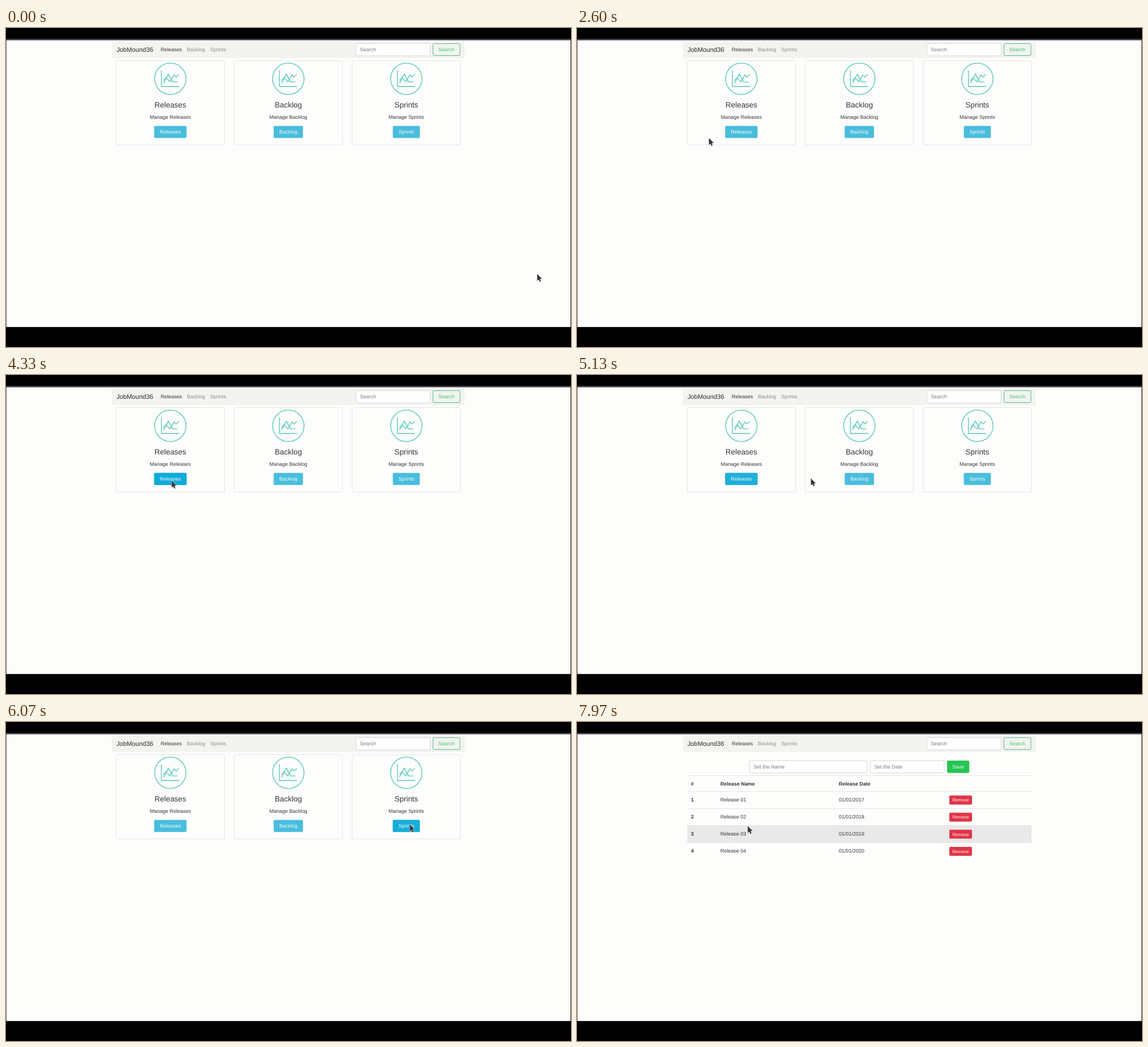
Recreate the animation shown at these times as an HTML page with a canvas. Size 997 by 562 pixels, loop 8000 ms.

```html
<!DOCTYPE html>
<html lang="en">
<head>
<meta charset="utf-8">
<title>Release board</title>
<style>
html, body { margin: 0; width: 100%; height: 100%; overflow: hidden; background: #000; }
canvas { display: block; }
</style>
</head>
<body>
<canvas id="stage" width="997" height="562"></canvas>
<script>
const ctx = document.getElementById('stage').getContext('2d');
const LOOP = 8000, OPEN_TABLE = 7730, ROW_HOVER = 7850, FADE = 200;
const BASE = 8.97, INK = '#333639', MUTED = '#777b7e', RULE = '#e4e4e4', PAGE = '#fdfdfc';
const BUTTON_TOP = 172.6, BUTTON_HEIGHT = 21.2;

// Stops of the pointer: time, x, y
const stops = [
  [0, 937, 433], [170, 937, 433], [830, 937, 427], [1570, 937, 427],
  [1770, 553, 314], [2370, 233, 194], [3100, 232, 193], [3730, 290, 120],
  [4300, 292, 186], [5040, 290, 183], [5130, 412, 182], [6070, 712, 180],
  [6130, 720, 181], [6450, 440, 184], [6670, 358, 184], [7170, 301, 183],
  [LOOP, 301, 183]
];

const cards = ['Releases', 'Backlog', 'Sprints'].map((name, i) => ({ name, x: 290 + 208.2 * i }));

const smooth = v => v * v * (3 - 2 * v);

// Monotone spline slope: zero wherever the pointer turns or rests
function slope(i, k) {
  if (i < 1 || i >= stops.length - 1) return 0;
  const [a, b, c] = stops.slice(i - 1, i + 2);
  const before = (b[k] - a[k]) / (b[0] - a[0]);
  const after = (c[k] - b[k]) / (c[0] - b[0]);
  return before * after > 0 ? 2 * before * after / (before + after) : 0;
}

function pointerAt(t) {
  const i = Math.max(0, stops.findIndex(stop => stop[0] > t) - 1);
  const a = stops[i], b = stops[i + 1], span = b[0] - a[0], u = (t - a[0]) / span;
  return [1, 2].map(k => a[k] + (b[k] - a[k]) * smooth(u)
    + span * u * (1 - u) * ((1 - u) * slope(i, k) - u * slope(i + 1, k)));
}

// Share of the last moments the pointer spent over a button
function hoverAt(x, w, t) {
  const steps = 20;
  let inside = 0;
  for (let i = 0; i < steps; i++) {
    const [px, py] = pointerAt(Math.max(0, t - FADE * i / steps));
    if (Math.abs(px - x) < w / 2 && py > BUTTON_TOP && py < BUTTON_TOP + BUTTON_HEIGHT) inside++;
  }
  return smooth(inside / steps);
}

function fill(x, y, w, h, color) {
  ctx.fillStyle = color;
  ctx.fillRect(x, y, w, h);
}

function box(x, y, w, h, color, border) {
  ctx.beginPath();
  ctx.roundRect(x, y, w, h, 2);
  if (color) { ctx.fillStyle = color; ctx.fill(); }
  if (border) { ctx.strokeStyle = border; ctx.lineWidth = 1; ctx.stroke(); }
}

function setFont(size, weight = 400) {
  ctx.font = `${weight} ${size}px "Liberation Sans", Arial, sans-serif`;
  ctx.textRendering = 'geometricPrecision';
}

// y is the middle of the capitals
function text(str, x, y, { size = BASE, color = INK, align = 'left', weight } = {}) {
  setFont(size, weight);
  ctx.textAlign = align;
  ctx.fillStyle = color;
  ctx.fillText(str, x, y + size * .36);
}

function line(...points) {
  ctx.beginPath();
  points.forEach(([x, y]) => ctx.lineTo(x, y));
  ctx.stroke();
}

function input(label, x, y, w) {
  box(x, y, w, 21.5, '#fefefe', '#d8d8d8');
  text(label, x + 7, y + 10.5, { color: MUTED });
}

function drawNav() {
  fill(187, 23, 622, 30, '#f3f3f0');
  text('JobMound36', 195, 38, { size: 11.2, color: '#2b2b2b' });
  text('Releases', 273, 38);
  text('Backlog', 319.3, 38, { color: '#8b8b89' });
  text('Sprints', 360.5, 38, { color: '#8b8b89' });
  input('Search', 617.5, 27.5, 131);
  box(753.5, 27.5, 47.5, 21, null, '#4dbd8e');
  text('Search', 777.2, 38, { color: '#46c76e', align: 'center' });
}

function drawIcon(x, y) {
  ctx.save();
  ctx.translate(x, y);
  ctx.strokeStyle = '#6ccfc2';
  ctx.lineJoin = 'round';
  ctx.lineWidth = 1.6;
  ctx.beginPath();
  ctx.arc(0, 0, 27.7, 0, Math.PI * 2);
  ctx.stroke();
  line([-15.7, -15], [-15.7, 13.6], [15.5, 13.6]);
  line([-12, 7.5], [-3.5, -8.5], [4, 5.5], [12.5, 5.5]);
  line([-12, 3], [-7.5, -2], [-1, 5.5], [6.5, -7], [10, -3], [15, -8]);
  ctx.restore();
}

function drawCard({ name, x }, t) {
  const center = { align: 'center' };
  box(x - 95.5, 57.5, 191, 148.5, null, RULE);
  drawIcon(x, 89.5);
  text(name, x, 135, { ...center, size: 13.45 });
  text('Manage ' + name, x, 156.3, center);

  setFont(BASE);
  const w = ctx.measureText(name).width + 19.8;
  box(x - w / 2, BUTTON_TOP, w, BUTTON_HEIGHT, '#49bddd');
  ctx.globalAlpha = hoverAt(x, w, t);
  box(x - w / 2, BUTTON_TOP, w, BUTTON_HEIGHT, '#0fabd9');
  ctx.globalAlpha = 1;
  text(name, x, 183, { ...center, color: '#f4fbfd' });
}

function drawTable(t) {
  const bold = { weight: 700 };
  const left = 194.5, width = 607.5;
  input('Set the Name', 304.5, 68, 207.5);
  input('Set the Date', 517.5, 68, 130.5);
  box(653, 68, 39.2, 21.7, '#26c454');
  text('Save', 672.4, 78.5, { color: '#f4fff6', align: 'center' });
  fill(left, 94, width, 1, RULE);
  text('#', 201, 108.3, bold);
  text('Release Name', 253, 108.3, bold);
  text('Release Date', 462, 108.3, bold);
  for (let i = 0; i < 4; i++) {
    const y = 136.3 + i * 30.1, top = Math.round(y - 14.3);
    if (i === 2 && t >= ROW_HOVER) fill(left, top, width, 31, '#e9e9e9');
    fill(left, top, width, 1, RULE);
    text(i + 1, 201, y, bold);
    text('Release 0' + (i + 1), 253, y);
    text('01/01/' + (2017 + i), 462, y);
    box(657, y - 6.7, 40, 15.8, '#df3648');
    text('Remove', 677, y + 1.2, { size: 7.85, color: '#fff1f2', align: 'center' });
  }
}

function drawPointer([x, y]) {
  ctx.save();
  ctx.translate(x + .4, y + .6);
  ctx.beginPath();
  [[0, 0], [0, 11.6], [2.7, 9.3], [4.6, 13.4], [6.4, 12.6], [4.7, 8.5], [8.2, 8.3]]
    .forEach(p => ctx.lineTo(...p));
  ctx.closePath();
  ctx.lineJoin = 'round';
  ctx.lineWidth = 1.2;
  ctx.strokeStyle = '#d4d4d4';
  ctx.stroke();
  ctx.fillStyle = '#343438';
  ctx.fill();
  ctx.restore();
}

function draw(t) {
  fill(0, 0, 997, 562, '#000');
  fill(0, 19, 997, 3, '#3b3b47');
  fill(.6, 21.6, 995.6, 505.2, PAGE);
  drawNav();
  if (t < OPEN_TABLE) cards.forEach(card => drawCard(card, t));
  else drawTable(t);
  drawPointer(pointerAt(t));
}

const start = performance.now();
function tick() {
  draw((performance.now() - start) % LOOP);
  requestAnimationFrame(tick);
}
tick();
</script>
</body>
</html>
```
